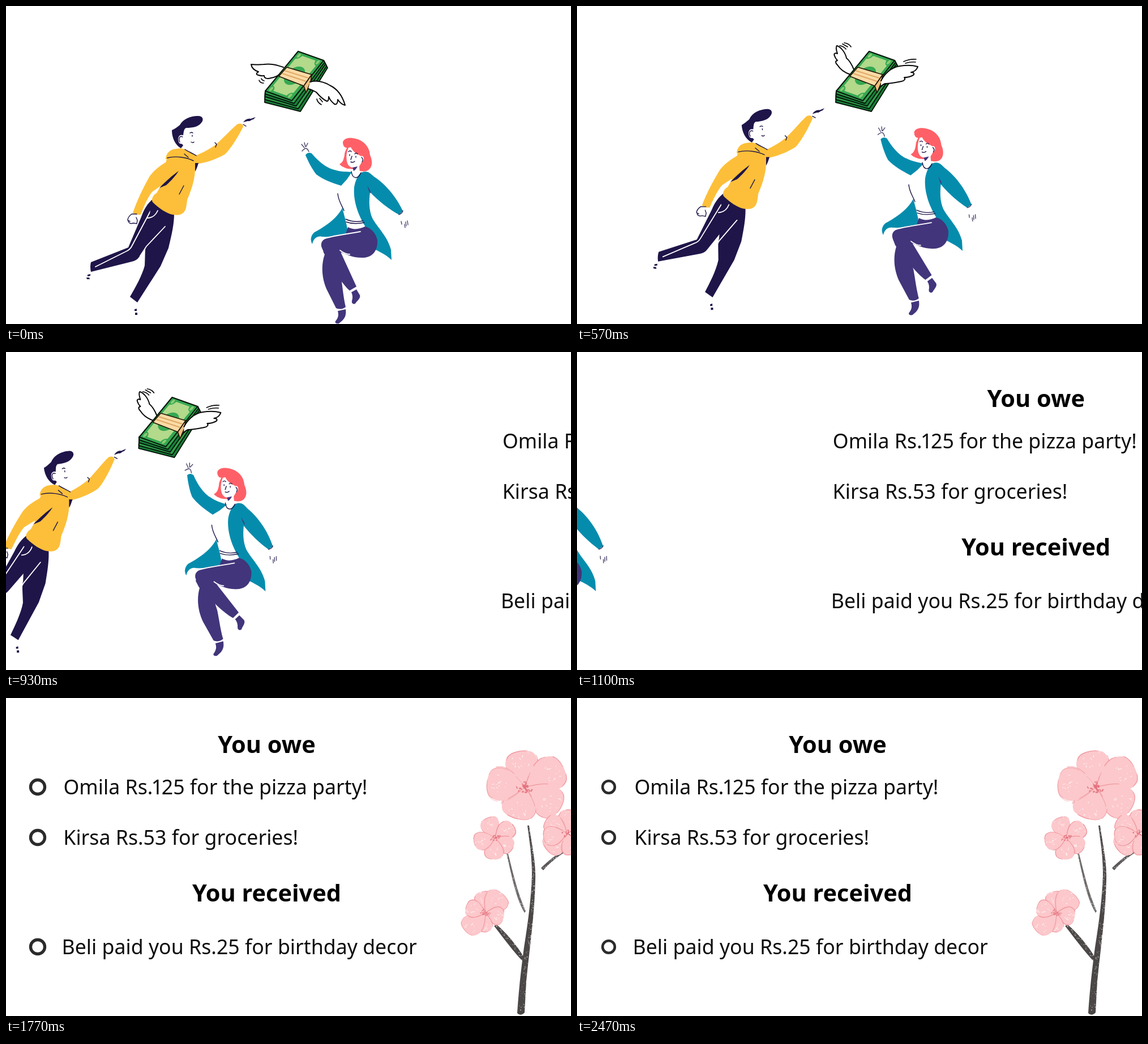
Write an HTML page that moves like this. It is 998x561 px and loops after 3.61 s.

```html
<!DOCTYPE html>
<html lang="en">
<head>
<meta charset="utf-8">
<title>Shared expenses</title>
<style>
html, body { margin: 0; width: 100%; height: 100%; overflow: hidden; background: #fff; }
svg { display: block; width: 100%; height: 100%; }
text { font-family: "Noto Sans", "Open Sans", sans-serif; font-size: 35.7px; fill: #0c0c0c; }
.head { font-size: 41.5px; font-weight: 700; text-anchor: middle; fill: #000; }
.navy { fill: #1f1549; }
.yellow { fill: #fdbf39; }
.teal { fill: #058cad; }
.plum { fill: #42357b; }
.coral { fill: #ff6067; }
.white { fill: #fff; }
.ink { fill: none; stroke: #1f1549; stroke-width: 1.4; stroke-linecap: round; }
.seam { fill: none; stroke: #fff; stroke-width: 1.8; stroke-linecap: round; }
.wing { fill: #fff; stroke: #080808; stroke-width: 2; stroke-linejoin: round; stroke-linecap: round; }
.flick { fill: none; stroke: #080808; stroke-width: 1.7; stroke-linecap: round; }
.ring { fill: none; stroke: #2b2b2b; stroke-width: 4.6; }
</style>
</head>
<body>
<svg viewBox="0 0 998 561" preserveAspectRatio="none">
<g id="chase">
  <g id="man">
    <g id="backLeg">
      <path class="navy" d="M260 340C248 350 243 361 239 372L216 426 150 452Q148 460 150 469L222 451Q231 449 235 443L264 402 290 362Z"/>
      <path class="seam" d="M255 362L222 424Q219 430 212 433L158 460"/>
      <path class="navy" d="M144 474l5-1 0 3-5 1zM142 479l5 0 1 3-5 0z"/>
    </g>
    <g id="frontLeg">
      <path class="navy" d="M297 366C297 385 293 402 287 427L273 459 232 523 219 513C227 499 240 477 245 458 246 440 245 428 248 420L256 350Z"/>
      <path class="seam" d="M281 389L248 424 237 441M268 361C264 370 258 374 249 374"/>
      <path class="navy" d="M227 535l4-1 0 4-4 0zM228 541l4 0 0 4-4 0z"/>
    </g>
    <path class="yellow" d="M284 270L336 265C338 275 337 283 334 290 333 311 325 330 320 342 319 352 318 360 314 364 308 370 300 369 294 368 284 366 270 357 259 346 256 341 260 333 266 330L273 318 275 300Z"/>
    <g id="reach">
      <path class="yellow" d="M332 265C348 259 362 251 371 244 385 232 395 220 408 209 413 206 419 208 419 213 410 231 395 255 386 262 372 270 355 276 341 278L332 283Z"/>
      <path class="ink" d="M369 241L372 244 370 249M419 209L424 212"/>
      <path class="navy" d="M419 205C423 200 427 198 432 199L441 196 437 200C433 200 432 204 427 203Z"/>
    </g>
    <path class="navy" d="M334 277L340 277C338 283 337 287 334 292Z"/>
    <g id="trail">
      <path class="yellow" d="M292 270C275 279 262 289 254 300 243 319 231 344 224 365Q230 369 238 368C243 355 250 338 258 328L275 316 305 291Z"/>
      <path class="ink" d="M231 367L222 367C218 370 215 374 215 378L219 380M216 380C218 385 222 384 225 383L231 384 232 378 230 373"/>
    </g>
    <path class="navy" d="M305 291C294 299 283 308 271 321L283 316C292 308 300 299 305 291Z"/>
    <path class="ink" d="M314 317L306 332"/>
    <path class="yellow" d="M282 270C283 259 290 253 300 252 306 251 311 251 316 253 323 258 330 260 336 264 338 269 335 274 329 275Z"/>
    <path class="ink" d="M285 268C300 264 319 267 331 273M316 253C322 257 330 260 336 264M315 261L322 267"/>
    <g id="manHead">
      <path class="navy" d="M293 219C298 217 303 213 307 210 313 198 329 193 341 194 349 195 349 202 345 206 340 213 330 215 318 215 314 217 314 222 313 228 305 225 302 234 306 242 309 244 311 242 313 246L309 251C299 245 293 233 293 219Z"/>
      <path class="ink" d="M312 231C307 228 304 234 307 240M325 224Q328 222 330 224M329 228v2M327 240Q330 242 332 240"/>
    </g>
  </g>

  <g id="woman">
    <g id="lowerLeg">
      <path class="plum" d="M563 438C556 458 558 480 566 499L583 533Q592 537 600 531C596 515 595 499 592 480L580 436ZM586 538L600 535C601 543 600 549 594 555L588 560C584 561 580 559 582 556 587 550 588 545 586 538Z"/>
    </g>
    <path class="teal" d="M594 356C586 373 566 388 545 399 538 405 537 413 541 420 543 410 550 405 558 407 575 408 590 404 604 401 603 388 598 372 594 356Z"/>
    <path class="teal" d="M626 295C633 290 640 292 646 299L643 328C641 345 641 360 647 374 656 391 674 406 680 430L681 448C672 439 655 430 638 424L634 388C623 370 613 345 615 320 617 308 621 300 626 295Z"/>
    <g id="shin">
      <path class="plum" d="M558 423C564 413 590 420 592 436L619 495 607 502C594 491 574 459 561 435Z"/>
      <path class="plum" d="M610 505L619 500 625 510C627 516 620 520 617 525 613 527 610 524 611 520 613 514 612 509 610 505Z"/>
    </g>
    <path class="plum" d="M557 419C559 408 580 404 600 402L604 390C614 396 626 393 634 389 645 391 654 402 656 413 657 431 648 443 632 444 612 445 600 437 590 434L562 434C558 428 556 423 557 419Z"/>
    <path class="seam" d="M556 413C568 406 600 403 626 398M590 431Q599 438 607 438"/>
    <path class="ink" d="M600 376C611 381 622 381 631 379M601 381C612 385 624 384 633 382"/>
    <path class="ink" d="M586 331C587 344 594 353 597 361"/>
    <g id="wave">
      <path class="teal" d="M529 263Q533 257 540 260C548 270 565 286 580 289 592 293 602 292 611 293L602 306 592 317C575 312 560 306 548 297 541 288 534 275 529 263Z"/>
      <path class="ink" d="M522 244L527 250M527 241L529 248M533 242L530 248M523 256C529 249 532 250 535 257" stroke-opacity=".8"/>
    </g>
    <g id="sway">
      <path class="teal" d="M634 293C640 291 645 297 650 301 670 314 690 337 701 362L694 368C681 361 658 345 642 327Z"/>
      <path class="ink" d="M694 368Q700 366 701 361M698 380L699 385M704 385L705 391M706 381L707 388M709 379L710 386" stroke-opacity=".8"/>
    </g>
    <path class="plum" d="M638 317C641 323 645 326 644 331L641 326Z"/>
    <g id="womanHead">
      <path class="coral" d="M595 240C597 234 604 232 612 233 630 235 642 247 643 263 648 273 648 287 637 291 629 293 620 290 614 287 606 289 594 285 589 279 595 276 597 270 598 262 598 258 601 253 602 250 597 250 595 245 595 240Z"/>
      <path class="white" d="M605 250C600 260 600 276 606 282 610 286 613 284 614 286L611 296Q618 306 625 295L624 283 628 276C634 274 633 262 627 265L624 263C618 261 612 255 609 249Z"/>
      <path class="ink" d="M605 257Q608 254 610 257M616 261Q619 258 621 261M607 262v2M618 265v2M611 265L609 271M609 275Q613 277 616 274M628 267Q632 270 629 275"/>
      <path class="plum" d="M612 285L621 283C619 287 616 290 614 291Z"/>
    </g>
    <path class="ink" d="M610 292C612 306 622 306 627 294"/>
  </g>

  <g id="money">
    <g id="wingsDown">
      <path class="wing" d="M490 108C480 105 470 101 455 103 445 104 437 103 433 103 434 110 440 114 446 116 442 118 441 121 446 122 452 124 454 123 456 123 456 128 462 129 468 127 476 126 482 122 487 118"/>
      <path class="flick" d="M447 131Q449 136 455 136M451 128Q452 131 456 132"/>
    </g>
    <g id="wingsUp">
      <path class="wing" d="M489 112C484 100 480 95 476 92 474 82 466 72 459 70 457 72 458 78 460 84 456 82 453 84 455 88 456 92 458 94 460 96 456 97 456 100 460 104 465 112 474 118 483 121"/>
      <path class="flick" d="M464 70Q471 71 475 76M472 65Q480 66 484 72M469 67L478 72"/>
    </g>
    <g id="stack" stroke="#06140a" stroke-width="1.9" stroke-linejoin="round"></g>
    <g transform="matrix(45 16 -58 70 516 80)">
      <path fill="#35a852" d="M0 0H1V1H0Z"/>
      <path fill="#b3d98b" d="M.24 .06H.76Q.78 .15 .9 .16V.84Q.78 .85 .76 .94H.24Q.22 .85 .1 .84V.16Q.22 .15 .24 .06Z"/>
      <ellipse cx=".5" cy=".5" rx=".3" ry=".22" fill="#35a852"/>
      <ellipse cx=".5" cy=".5" rx=".16" ry=".12" fill="#1b8a3d"/>
      <g fill="#8ccb74"><circle cx=".13" cy=".08" r=".05"/><circle cx=".87" cy=".08" r=".05"/><circle cx=".13" cy=".92" r=".05"/><circle cx=".87" cy=".92" r=".05"/></g>
    </g>
    <path fill="none" stroke="#06140a" stroke-width="2" stroke-linejoin="round" d="M516 80L561 96 505 167 458 150Z"/>
    <g stroke="#241708" stroke-width="1.7" stroke-linejoin="round">
      <path fill="#fadba6" d="M496 108L540 121 526 141 482 124Z"/>
      <path fill="#efc07f" d="M540 121L538 134 530 153 526 141Z"/>
    </g>
    <path fill="none" stroke="#dfa764" stroke-width="2" d="M492 114L534 127M488 119L530 133"/>
    <g id="wingsDownR">
      <path class="wing" d="M537 134C548 131 560 133 572 140 585 146 594 158 599 175 594 174 590 171 586 165 586 171 584 175 580 173 574 168 571 163 570 160 570 165 569 168 567 168 560 165 553 158 548 152 543 149 538 147 534 146"/>
      <path class="flick" d="M549 164Q550 170 557 174M554 163L559 169"/>
    </g>
    <g id="wingsUpR">
      <path class="wing" d="M537 132C543 120 555 108 570 106 583 104 595 105 602 107 600 113 596 116 590 117 596 117 597 121 592 123 588 125 583 126 578 126 581 129 578 132 573 133 563 135 552 137 544 137 540 139 538 140 537 142"/>
      <path class="flick" d="M577 98Q588 93 599 94M580 101Q590 98 598 99"/>
    </g>
  </g>
</g>

<g id="ledger">
  <text class="head" x="460.5" y="97">You owe</text>
  <text x="101.5" y="170">Omila Rs.<tspan dx="-2.5">1</tspan><tspan dx="-2.5">25 for the pizza party!</tspan></text>
  <text x="101.3" y="259">Kirsa Rs.53 for groceries!</text>
  <text class="head" x="460.5" y="358.5">You received</text>
  <text x="98.5" y="452">Beli paid you Rs.25 for birthday decor</text>
  <g id="rings"></g>
  <g id="plant"></g>
</g>
</svg>
<script>
const LOOP = 3610, W = 998;
const $ = id => document.getElementById(id);
const clamp = x => Math.max(0, Math.min(1, x));
const smooth = x => (x = clamp(x), x * x * (3 - 2 * x));
const swing = (t, span) => (1 - Math.cos(Math.PI * clamp(t / span))) / 2;
const lerp = (a, b, k) => a + (b - a) * k;

let seed = 7;
const rnd = (a = 0, b = 1) => {
  seed = (seed * 16807) % 2147483647;
  return a + (b - a) * seed / 2147483647;
};

function add(parent, tag, attrs) {
  const el = document.createElementNS("http://www.w3.org/2000/svg", tag);
  for (const k in attrs) el.setAttribute(k, attrs[k]);
  return parent.appendChild(el);
}

// Edges of the bills below the top one, deepest first
for (let i = 4; i > 0; i--) {
  const k = i / 4;
  const left = [458 - k, 150 + 20 * k], low = [lerp(505, 520, k), lerp(167, 186, k)];
  const right = [561 + 7 * k, 96 + 13 * k];
  add($("stack"), "path", { d: `M458 150L${left}L${low}L${right}L561 96Z`, fill: i % 2 ? "#2f9f4b" : "#177f38" });
}

const plant = $("plant");

function stem(d, from, ctrl, to, w0, w1, color, grains) {
  add(plant, "path", { d, fill: color });
  for (let i = 0; i < grains; i++) {
    const t = rnd(), u = 1 - t, w = lerp(w0, w1, t) / 2;
    const at = k => u * u * from[k] + 2 * u * t * ctrl[k] + t * t * to[k];
    add(plant, "circle", {
      cx: at(0) + rnd(-w, w), cy: at(1) + rnd(-w, w), r: rnd(.5, 1.1), fill: "#fff", opacity: rnd(.25, .6)
    });
  }
}

stem("M921 225L924 225C929 260 936 290 935 320 934 380 925 440 919 500L916 555Q909 562 903 556C906 510 911 470 915 440 923 390 928 350 929 310 929 280 925 255 921 225Z",
  [924, 228], [944, 330], [909, 556], 3, 12, "#4b4747", 180);
stem("M884 275L887 275C895 305 902 340 918 376L916 379C899 350 893 310 884 275Z",
  [885, 275], [894, 325], [917, 377], 2, 3, "#6e6a6a", 40);
stem("M988 267L989 271C975 279 960 291 949 304L945 300C957 288 970 277 988 267Z",
  [988, 269], [965, 283], [947, 302], 3, 6, "#5a5656", 30);
stem("M862 402L867 400C884 415 902 435 917 461L914 466C897 448 879 424 862 402Z",
  [864, 401], [892, 426], [915, 463], 5, 7, "#4b4747", 45);

// petals: [angle, length, half width as a share of the length]
function flower(cx, cy, size, petals) {
  const g = add(plant, "g", { transform: `translate(${cx} ${cy})` });
  for (const [a, l, share] of petals) {
    const p = add(g, "g", { transform: `rotate(${a})` }), w = l * share;
    const d = `M0 0C${l * .25} ${-w * .6} ${l * .55} ${-w * 1.3} ${l * .88} ${-w * .8}`
      + `C${l * 1.04} ${-w * .5} ${l * 1.03} ${w * .5} ${l * .9} ${w * .8}C${l * .6} ${w * 1.3} ${l * .25} ${w * .6} 0 0Z`;
    add(p, "path", { d, fill: "#fcc8cb" });
    for (let i = 0; i < 2; i++) {
      add(p, "path", {
        d, fill: "none", stroke: "#ed8e96", "stroke-width": rnd(.7, 1.2), opacity: .75,
        "stroke-dasharray": `${rnd(20, 45)} ${rnd(12, 30)}`, transform: `rotate(${rnd(-2, 2)})`
      });
    }
    for (let i = 0; i < size * 14; i++) {
      const r = rnd(.5, .95) * l, b = rnd(-.32, .32);
      add(p, "path", {
        d: `M${r * Math.cos(b)} ${r * Math.sin(b)}l${rnd(-4, 4)} ${rnd(-2, 2)}`,
        stroke: "#fff", "stroke-width": 1.2, opacity: rnd(.3, .75), "stroke-linecap": "round"
      });
    }
  }
  for (let i = 0; i < 26; i++) {
    const a = rnd(0, 6.28), r = rnd(1, 16) * size;
    const x = r * Math.cos(a), y = r * .6 * Math.sin(a);
    add(g, "path", {
      d: `M${x} ${y}l${rnd(-3, 3) * size} ${rnd(-3, 3) * size}`, stroke: "#e26f7b",
      "stroke-width": rnd(1.5, 3) * size, "stroke-linecap": "round", opacity: .8
    });
  }
}

flower(917, 157, 1, [[-99, 64, .46], [-28, 76, .42], [32, 73, .42], [107, 58, .54], [187, 68, .45]]);
flower(864, 247, .62, [[-112, 38, .46], [-35, 39, .43], [32, 36, .44], [95, 38, .46], [168, 38, .44]]);
flower(991, 239, .62, [[-80, 42, .5], [-148, 44, .42], [140, 46, .46], [172, 42, .42], [70, 38, .5]]);
flower(847, 379, .6, [[-95, 38, .48], [-48, 45, .5], [15, 33, .5], [100, 34, .48], [138, 48, .42], [-160, 36, .44]]);

const rings = [157, 246, 439].map(y => [y, add($("rings"), "circle", { class: "ring", r: 10.8 })]);

// part: full turn, pivot, time to reach it
const joints = {
  backLeg: [5.8, 270, 355, 1000], frontLeg: [-4.2, 270, 355, 1000], reach: [-4.6, 335, 270, 1000],
  trail: [3.5, 290, 275, 1000], manHead: [-6.3, 315, 252, 1000],
  wave: [17, 605, 300, 1050], sway: [6.3, 636, 300, 1000],
  shin: [-16.5, 585, 428, 1300], lowerLeg: [-2.7, 625, 400, 1000]
};

function ringScale(t) {
  if (t < 1330) return 0;
  if (t < 1650) return 1.2 * (1 - (1 - (t - 1330) / 320) ** 3);
  return 1 + .2 * (1 - clamp((t - 1650) / 800)) ** 1.3;
}

const move = (id, x, y) => $(id).setAttribute("transform", `translate(${x} ${y})`);
const show = (id, on) => $(id).setAttribute("visibility", on ? "visible" : "hidden");

function draw(t) {
  const x = W * smooth((t - 755) / 576);
  move("chase", -x, 0);
  move("ledger", W - x, 0);

  const lift = swing(t, 1000);
  move("man", 0, -17.3 * lift);
  move("woman", 0, -26 * lift);
  move("womanHead", .8 * lift, -2.5 * lift);
  for (const id in joints) {
    const [turn, px, py, span] = joints[id];
    $(id).setAttribute("transform", `rotate(${turn * swing(t, span)} ${px} ${py})`);
  }

  const up = t % 320 >= 160;
  show("wingsUp", up);
  show("wingsUpR", up);
  show("wingsDown", !up);
  show("wingsDownR", !up);

  const s = ringScale(t);
  for (const [y, el] of rings) el.setAttribute("transform", `translate(56 ${y}) scale(${s})`);
}

const start = performance.now();
function tick() {
  draw((performance.now() - start) % LOOP);
  requestAnimationFrame(tick);
}
draw(0);
requestAnimationFrame(tick);
</script>
</body>
</html>
```
